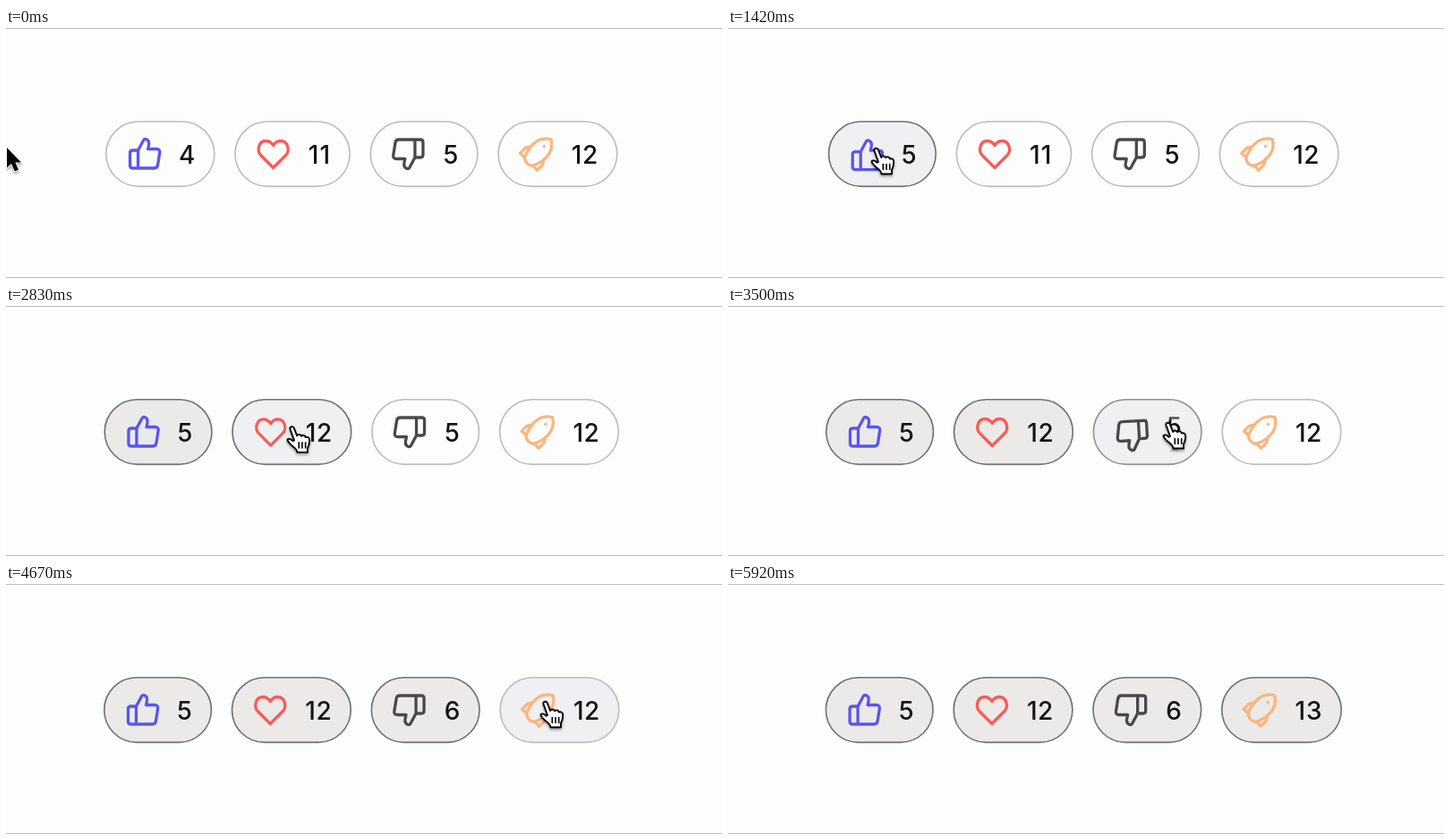
An HTML page that plays this animation: 800 by 280 pixels, repeating every 6000 ms.

```html
<!DOCTYPE html>
<html lang="en">
<head>
<meta charset="utf-8">
<title>Reaction buttons</title>
<style>
  html, body { margin: 0; width: 100%; height: 100%; overflow: hidden; background: #fefdfe; }
  svg { display: block; width: 100vw; height: 100vh; }
  text { font: 500 28px Inter, "Liberation Sans", sans-serif; fill: #131316; text-anchor: middle; }
  .icon { fill: none; stroke-width: 3.3; stroke-linecap: round; stroke-linejoin: round; }
  #cursor { filter: drop-shadow(0 2px 1.5px rgba(0, 0, 0, .35)); }
</style>
</head>
<body>
<svg id="stage" viewBox="0 0 800 280" xmlns="http://www.w3.org/2000/svg">
  <defs>
    <linearGradient id="fade" x1="0" y1="118" x2="0" y2="164" gradientUnits="userSpaceOnUse">
      <stop offset="0" stop-color="#000"/>
      <stop offset=".24" stop-color="#fff"/>
      <stop offset=".78" stop-color="#fff"/>
      <stop offset="1" stop-color="#000"/>
    </linearGradient>
    <mask id="window" maskUnits="userSpaceOnUse" x="0" y="118" width="800" height="46">
      <rect y="118" width="800" height="46" fill="url(#fade)"/>
    </mask>
  </defs>
  <rect width="800" height="280" fill="#fefdfe"/>
  <path d="M0 .5H800M0 279.5H800" stroke="#bcbbbd"/>
  <g id="pills"></g>
  <g id="counts" mask="url(#window)"></g>
  <g id="cursor">
    <path id="arrow" d="M0 0V22.5L5 18L8.8 26.5L13 24.7L9.3 16.4H16Z" fill="#000" stroke="#fff" stroke-width="1.8" paint-order="stroke"/>
    <g id="hand" stroke="#000" stroke-width="1.9" stroke-linejoin="round" stroke-linecap="round">
      <path fill="#fff" d="M-2.6 1.2C-3.2-1.4 .6-2.4 2 .6L5.2 9C6 6.8 9.6 7 10 9.4C11.4 7.6 14.4 8.2 14.8 10.6C16.4 9.6 19 10.6 19.2 13.5C19.5 18 18.5 20 17 23V27.5H5.5C5 24 2 22-.5 20C-3 17.5-5.2 15.5-5.5 13.6C-5.2 11.6-2 12 .6 14.8L2 14Z"/>
      <path fill="none" stroke-width="1.6" d="M7.3 16.5V22.5M11 16.5V22.5M14.7 16.5V22.5"/>
    </g>
  </g>
</svg>
<script>
const LOOP = 6000, FPS = 12, CENTER = 397.3, GAP = 21.5, PILL_BASE = 104.3, TEXT_X = 82, ROLL = 36;
const digitWidth = { 1: 12.75, 2: 17.25, 3: 18, 4: 18.3, 5: 17, 6: 18 };
const PAGE = [254, 253, 254], HOVER = [240, 239, 241], PICKED = [235, 234, 232];
const EDGE = [188, 187, 190], EDGE_PICKED = [112, 112, 114];

const thumb = 'M-7-4H-13Q-16-4-16-1V13Q-16 16-13 16H-7ZM-7-4L-.8-15.5Q0-17 2-16.5Q6-15 5-10L4-5.5H13.5Q17.8-5.5 17.2-1.5L15 12.5Q14.5 16 11 16H-7';
const heart = 'M0 15.5L-14 1.5C-19-4-16-14.5-8.5-14.5C-4-14.5-1.5-12 0-9.5C1.5-12 4-14.5 8.5-14.5C16-14.5 19-4 14 1.5Z';
const rocket = 'M0-23C7-19 10.5-12 10.5-4Q10.5 4 6 13Q0 17-6 13Q-10.5 4-10.5-4C-10.5-12-7-19 0-23ZM-10-2L-13.5 4V12.5L-7 12M10-2L13.5 4V12.5L7 12M0-12.2V-12';

// kick: damped swing that starts with a click, turned into a transform per icon
const pills = [
  { color: '#5a54f1', path: thumb, lead: '', from: '4', to: '5', click: 795, enter: 700, leave: 1980,
    pose: k => `translate(0 ${-6 * k})` },
  { color: '#fa5b56', path: heart, lead: '1', from: '1', to: '2', click: 2155, enter: 2035, leave: 2970,
    pose: k => `scale(${1 + .17 * k})` },
  { color: '#49494b', path: thumb, turn: 180, lead: '', from: '5', to: '6', click: 3430, enter: 3010, leave: 4350,
    pose: k => `translate(${2 * k} ${6 * k}) rotate(${-5 * k})` },
  { color: '#fbb57d', path: rocket, turn: 45, lead: '1', from: '2', to: '3', click: 4780, enter: 4415, leave: 5240,
    pose: k => `translate(${9 * k} ${-9 * k})` }
];

const easeIn = p => p * p, smooth = p => p * p * (3 - 2 * p);
// start, end, target x, target y, easing
const moves = [
  [40, 800, 160, 136, easeIn],
  [830, 1400, 166, 136, smooth],
  [1600, 2130, 297, 137, easeIn],
  [2720, 3250, 492, 132, smooth],
  [4150, 4660, 603, 133, smooth],
  [5000, 5340, 703, 101, smooth]
];

const byId = id => document.getElementById(id);
const clamp = v => Math.max(0, Math.min(1, v));
const mix = (a, b, p) => a.map((v, i) => v + (b[i] - v) * p);
const rgb = c => `rgb(${c.map(Math.round)})`;
const width = s => [...s].reduce((sum, d) => sum + digitWidth[d], 0);

function add(parent, tag, attrs, label) {
  const el = document.createElementNS('http://www.w3.org/2000/svg', tag);
  set(el, attrs);
  if (label) el.textContent = label;
  return parent.appendChild(el);
}
function set(el, attrs) {
  for (const k in attrs) el.setAttribute(k, attrs[k]);
}

for (const p of pills) {
  p.box = add(byId('pills'), 'rect', { y: 104.8, height: 72.6, rx: 36.3, 'stroke-width': 1.6 });
  p.icon = add(byId('pills'), 'g', { class: 'icon', stroke: p.color });
  add(p.icon, 'path', { d: p.path, transform: `rotate(${p.turn || 0})` });
  p.first = add(byId('counts'), 'text', {}, p.lead);
  p.old = add(byId('counts'), 'text', {}, p.from);
  p.next = add(byId('counts'), 'text', {}, p.to);
}

function roll(ms) {
  const u = Math.max(0, ms) * .012;
  return 1 - (1 + u) * Math.exp(-u);
}

function kick(ms) {
  if (ms <= 0 || ms >= 850) return 0;
  if (ms < 150) return Math.sin(ms / 150 * Math.PI / 2);
  if (ms < 550) return 1 - 1.3 * smooth((ms - 150) / 400);
  return -.3 * (1 - smooth((ms - 550) / 300));
}

function cursorAt(t) {
  let x = 1, y = 134;
  for (const [start, end, tx, ty, ease] of moves) {
    const p = ease(clamp((t - start) / (end - start)));
    x += (tx - x) * p;
    y += (ty - y) * p;
  }
  return [x, y];
}

function draw(t) {
  const sizes = pills.map(p => PILL_BASE + width(p.lead + (t < p.click ? p.from : p.to)));
  let x = CENTER - (sizes.reduce((a, b) => a + b) + 3 * GAP) / 2;
  pills.forEach((p, i) => {
    const since = t - p.click, picked = clamp(since / 120);
    const hover = clamp((t - p.enter) / 100) * (1 - clamp((t - p.leave) / 120));
    set(p.box, {
      x: x + .8, width: sizes[i] - 1.6,
      fill: rgb(mix(mix(PAGE, PICKED, picked), HOVER, hover)),
      stroke: rgb(mix(EDGE, EDGE_PICKED, picked))
    });
    set(p.icon, { transform: `translate(${x + 43.5} 141) ${p.pose(kick(since))}` });

    const lead = width(p.lead), tx = x + TEXT_X, r = roll(since);
    const last = tx + lead + digitWidth[since < 0 ? p.from : p.to] / 2;
    set(p.first, { x: tx + lead / 2, y: 152 });
    set(p.old, { x: last, y: 152 - ROLL * r });
    set(p.next, { x: last, y: 152 + ROLL * (1 - r) });
    x += sizes[i] + GAP;
  });

  const over = pills.some(p => t >= p.enter && t < p.leave);
  set(byId('cursor'), {
    transform: `translate(${cursorAt(t).join(' ')})`,
    opacity: 1 - clamp((t - 5300) / 80)
  });
  set(byId('arrow'), { visibility: over ? 'hidden' : 'visible' });
  set(byId('hand'), { visibility: over ? 'visible' : 'hidden' });
}

let begin = null;
function tick(now) {
  if (begin === null) begin = now;
  // the motion advances in steps of a twelfth of a second
  const t = (now - begin) % LOOP;
  draw(Math.floor((t + 4) * FPS / 1000) * 1000 / FPS % LOOP);
  requestAnimationFrame(tick);
}
draw(0);
requestAnimationFrame(tick);
</script>
</body>
</html>
```
